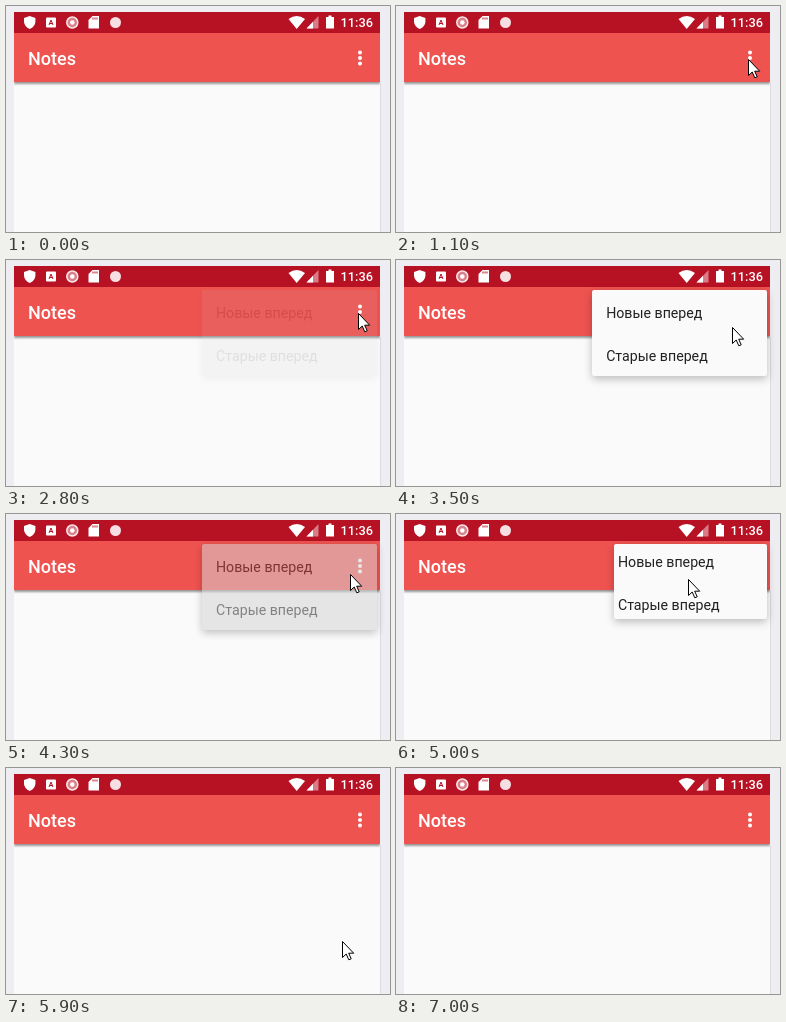
An HTML page for the animation above (7.3 s loop, 384 px wide and 226 px high).

```html
<!DOCTYPE html>
<html lang="ru">
<head>
<meta charset="utf-8">
<style>
html, body { margin: 0; width: 100%; height: 100%; overflow: hidden; background: #eeeef2; }
body { position: relative; font-family: Roboto, sans-serif; }
div, svg, span { position: absolute; }
span { white-space: nowrap; line-height: 20px; }
#page { left: 8px; top: 6px; width: 366px; height: 220px; overflow: hidden; background: #fafafa; }
#edge { left: 374px; top: 77px; width: 1px; height: 149px; background: #dcdce0; }
#status { width: 366px; height: 21px; background: #b71124; }
#bar { top: 21px; width: 366px; height: 49px; background: #ef5350; box-shadow: 0 2px 2px rgba(0,0,0,.4); }
#title { left: 22px; top: 43px; font-size: 18px; font-weight: 500; color: #fff; }
#clock { left: 334.5px; top: 7px; font-size: 12.8px; font-weight: 500; color: #fff; }
#shade { border-radius: 2px; background: rgba(0,0,0,.16); box-shadow: 0 3px 9px rgba(0,0,0,.25); }
#menu { overflow: hidden; border-radius: 2px; background: #fafafa; font-size: 14.2px; color: #212121; }
#items { width: 175px; height: 86px; }
#items span { left: 14px; }
#press { width: 175px; height: 43px; overflow: hidden; background: rgba(0,0,0,.05); }
#ripple { border-radius: 50%; background: rgba(0,0,0,.05); }
</style>
</head>
<body>
<div id="page"><div id="bar"></div><div id="status"></div></div>
<div id="edge"></div>
<span id="title">Notes</span>
<span id="clock">11:36</span>
<svg width="384" height="80" style="left:0;top:0" fill="#fff">
  <path d="M18 12L23.7 10L29.4 12V16Q29 20.5 23.7 23Q18.4 20.5 18 16Z"/>
  <rect x="40" y="11.5" width="10" height="10" rx="1"/>
  <path d="M43 19L45 14L47 19M43.5 17.5H46.5" fill="none" stroke="#b71124"/>
  <circle cx="66.3" cy="16.5" r="5.5" fill="#d9808a" stroke="#fbe9eb" stroke-width="1.5"/>
  <circle cx="66.3" cy="16.5" r="2.3"/>
  <path d="M86.5 10H93V22.5H82.5V14Z"/>
  <path d="M86.5 12.5H92" stroke="#b71124" stroke-width="2" stroke-dasharray="1"/>
  <circle cx="109.5" cy="16.5" r="5.5" fill="#f6dfe2"/>
  <path d="M282.5 13Q290.7 7 299 13L290.7 23Z"/>
  <path d="M312.5 10V22.5H300.5Z" fill="#d97c87"/>
  <path d="M307 15.7V22.5H300.5Z"/>
  <path d="M320 11H322.5V9.5H325.5V11H328V22.5H320Z"/>
  <path d="M354 46.5V58" stroke="#fff" stroke-width="4" stroke-linecap="round" stroke-dasharray="0 5.5"/>
</svg>
<div id="shade"></div>
<div id="menu">
  <div id="items">
    <div id="press"><div id="ripple"></div></div>
    <span style="top:13px">Новые вперед</span>
    <span style="top:56px">Старые вперед</span>
  </div>
</div>
<svg id="cursor" width="13" height="20">
  <path d="M.5 .5V16.5L4.2 13L6.8 18.8L9.2 17.8L6.7 12.2H11.7Z" fill="#fff" stroke="#000"/>
</svg>
<script>
const LOOP = 7300, STEP = 100, OPEN = 250, FADE = 220;
const MENU = { left: 196, top: 30, width: 175, height: 86 };
const $ = id => document.getElementById(id);
const clamp = v => Math.max(0, Math.min(1, v));
const smooth = p => p * p * (3 - 2 * p);
const show = (el, on) => el.style.display = on ? '' : 'none';

const visits = [
  { open: 1350, close: 2600 },
  { open: 3260, close: 4180 },
  { open: 4838, close: 5530, pressX: 289 }
];

const entry = { time: 900, at: [338, 98] };
const dots = [352, 53];
const moves = [
  { from: 900, until: 1100, to: dots },
  { from: 1500, until: 1800, to: [330, 53] },
  { from: 2300, until: 2800, to: dots },
  { from: 3300, until: 3700, to: [320, 80] },
  { from: 4100, until: 4400, to: dots },
  { from: 4700, until: 5000, to: [292, 65] },
  { from: 5450, until: 6200, to: [360, 232] }
];

function place(el, x, y, w, h) {
  Object.assign(el.style, { left: x + 'px', top: y + 'px', width: w + 'px', height: h + 'px' });
}

function drawCursor(t) {
  let [x, y] = entry.at;
  for (const { from, until, to } of moves) {
    const k = smooth(clamp((t - from) / (until - from)));
    x += (to[0] - x) * k;
    y += (to[1] - y) * k;
  }
  show($('cursor'), t >= entry.time);
  place($('cursor'), Math.round(x), Math.round(y), 13, 20);
}

function drawMenu(t) {
  const visit = visits.find(v => t > v.open && t < v.close + FADE);
  const boxes = [$('menu'), $('shade')];
  boxes.forEach(el => show(el, visit));
  if (!visit) return;

  const { open, close, pressX } = visit;
  const { left, top, width, height } = MENU;
  const rest = (1 - clamp((t - open) / OPEN)) ** 2;
  const alpha = 1 - clamp((t - close) / FADE);
  const cut = width * rest;
  boxes.forEach(el => place(el, left + cut, top, width - cut, height * (1 - rest)));
  $('menu').style.opacity = alpha;
  $('shade').style.opacity = Math.min(1, 2 * alpha);
  // The content slides in at about half the speed of the edge
  place($('items'), -.45 * cut, -.45 * height * rest, width, height);

  const held = t - close + 80;
  show($('press'), pressX && held > 0);
  const r = Math.max(0, held) * .36;
  place($('ripple'), pressX - left - r, 30 - r, 2 * r, 2 * r);
}

function frame(now) {
  const t = Math.floor(now % LOOP / STEP) * STEP;
  drawMenu(t);
  drawCursor(t);
  requestAnimationFrame(frame);
}
frame(performance.now());
</script>
</body>
</html>
```
